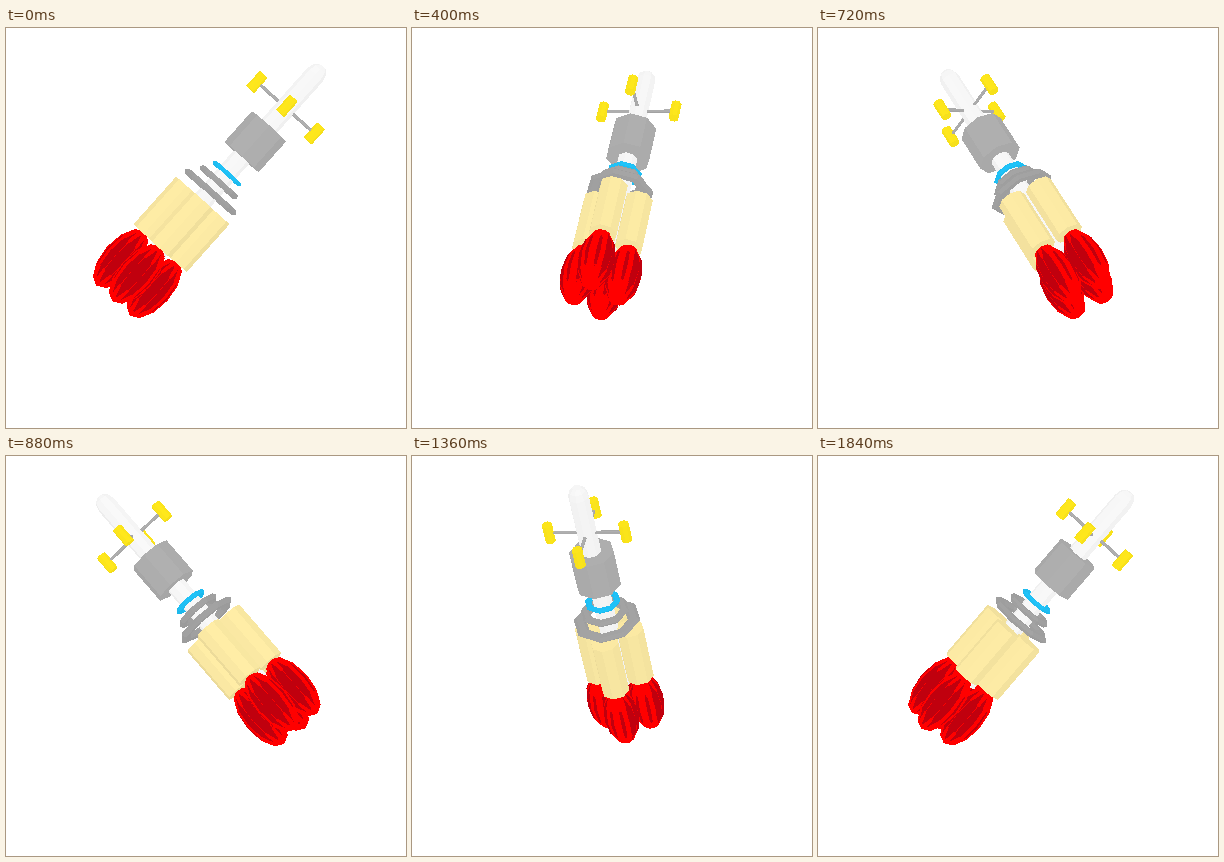
These frames come from a looping animation (400x400 px, 1920 ms). An HTML page with a canvas:

```html
<!DOCTYPE html>
<html lang="en">
<head>
<meta charset="utf-8">
<title>Rocket</title>
<style>
  html, body { margin: 0; width: 100%; height: 100%; overflow: hidden; background: #fff; }
  canvas { display: block; width: 100vw; height: 100vh; }
</style>
</head>
<body>
<canvas id="stage" width="400" height="400"></canvas>
<script>
const SIZE = 400, STEP_MS = 80, STEPS = 24, CAMERA = 2500;
const TILT = 41.8 * Math.PI / 180;
const PIVOT = { x: 201.5, y: 167.2, z: 6 };
const LIGHT = [0, 0.2, 0.98];

const WHITE = [249, 249, 249], GRAY = [176, 176, 176], RING = [165, 165, 165],
      BLUE = [32, 196, 250], CREAM = [255, 237, 166], YELLOW = [255, 232, 28],
      RED = [255, 0, 0], DARK = [192, 0, 14];

// Rocket axes: along the body, across it, and towards the viewer.
const ALONG = [Math.sin(TILT), Math.cos(TILT), 0];
const ACROSS = [Math.cos(TILT), -Math.sin(TILT), 0];
const FRONT = [0, 0, 1];
const SIDES = [0, 1, 2, 3].map(i => i * Math.PI / 2);

const faces = [];
const mix = (...terms) => [0, 1, 2].map(i => terms.reduce((sum, [k, v]) => sum + k * v[i], 0));
const outward = angle => mix([Math.cos(angle), ACROSS], [Math.sin(angle), FRONT]);

// Revolves a profile of [distance, radius] pairs around an axis.
function lathe(profile, color, o = {}) {
  const { base = [0, 0, 0], axis = ALONG, u = ACROSS, v = FRONT,
          segments = 8, phase = 0, shade = 0.08 } = o;
  const point = ([d, r], k) => {
    const a = (k + phase) * 2 * Math.PI / segments;
    return mix([1, base], [d, axis], [r * Math.cos(a), u], [r * Math.sin(a), v]);
  };
  for (let i = 1; i < profile.length; i++) {
    for (let k = 0; k < segments; k++) {
      const a = point(profile[i - 1], k), b = point(profile[i - 1], k + 1);
      const c = point(profile[i], k + 1), d = point(profile[i], k);
      if (profile[i - 1][1]) faces.push({ points: [a, b, c], color, shade });
      if (profile[i][1]) faces.push({ points: [a, c, d], color, shade });
    }
  }
}

const cylinder = (from, to, r, color, o) =>
  lathe([[from, 0], [from, r], [to, r], [to, 0]], color, o);

function arc(count, place) {
  return Array.from({ length: count + 1 }, (_, i) => place(i / count));
}

// A flattened torus between two radii.
function ring(at, inner, outer, thick, color) {
  const middle = (inner + outer) / 2, width = (outer - inner) / 2;
  lathe(arc(6, t => [at + thick * Math.sin(t * 2 * Math.PI),
                     middle + width * Math.cos(t * 2 * Math.PI)]), color, { shade: 0.06 });
}

// An ellipsoid with separate radii across and towards the front.
function ellipsoid(at, length, across, front, color, o) {
  lathe(arc(6, t => [at - length * Math.cos(t * Math.PI), t % 1 ? Math.sin(t * Math.PI) : 0]),
    color, { ...o, u: mix([across, ACROSS]), v: mix([front, FRONT]) });
}

function buildRocket() {
  lathe([[-80, 0], [-80, 10], [161, 10.3], [168, 8.5], [172, 4.5], [172, 0]], WHITE, { shade: 0.05 });
  cylinder(51, 92, 22.8, GRAY, { shade: 0.06 });
  ring(29, 11.5, 18.3, 2.6, BLUE);
  ring(17, 15.5, 24.8, 3.4, RING);
  ring(4.4, 21.5, 34.5, 3.7, RING);
  for (const angle of SIDES) {
    const out = outward(angle), side = outward(angle + Math.PI / 2);
    cylinder(0, 38, 1.7, GRAY, { base: mix([117, ALONG]), axis: out, u: ALONG, v: side, segments: 6 });
    cylinder(107, 127, 5.4, YELLOW, { base: mix([38.5, out]), shade: 0.05 });
    cylinder(-71, -7, 14.2, CREAM, { base: mix([21.5, out]) });
    // Two faceted bodies cut through each other, which leaves jagged tongues.
    const flame = { base: mix([22.5, out]), segments: 10, shade: 0 };
    ellipsoid(-105, 36.3, 18, 17.4, RED, flame);
    ellipsoid(-105, 34.6, 17.6, 18.4, DARK, { ...flame, phase: 0.5 });
  }
}

const context = document.getElementById('stage').getContext('2d');
const image = context.createImageData(SIZE, SIZE);
const pixels = new Uint32Array(image.data.buffer);
const depth = new Float32Array(SIZE * SIZE);

function litColor({ color, shade }, [a, b, c]) {
  const p = b.map((n, i) => n - a[i]), q = c.map((n, i) => n - a[i]);
  const n = [p[1] * q[2] - p[2] * q[1], p[2] * q[0] - p[0] * q[2], p[0] * q[1] - p[1] * q[0]];
  const facing = Math.sign(n[2]) / (Math.hypot(...n) || 1);
  const light = Math.max(0, facing * (n[0] * LIGHT[0] + n[1] * LIGHT[1] + n[2] * LIGHT[2]));
  const [r, g, bl] = color.map(v => Math.round(v * (1 - shade * (1 - light))));
  return (255 << 24 | bl << 16 | g << 8 | r) >>> 0;
}

function project([x, y, z]) {
  const scale = CAMERA / (CAMERA - z), half = SIZE / 2;
  return [half + (PIVOT.x + x - half) * scale, half + (PIVOT.y - y - half) * scale, z];
}

function fillTriangle([a, b, c], color) {
  const area = (b[0] - a[0]) * (c[1] - a[1]) - (b[1] - a[1]) * (c[0] - a[0]);
  if (Math.abs(area) < 1e-6) return;
  const range = i => [
    Math.max(0, Math.floor(Math.min(a[i], b[i], c[i]))),
    Math.min(SIZE - 1, Math.ceil(Math.max(a[i], b[i], c[i])))
  ];
  const [left, right] = range(0), [top, bottom] = range(1);
  for (let y = top; y <= bottom; y++) {
    for (let x = left; x <= right; x++) {
      const px = x + 0.5 - a[0], py = y + 0.5 - a[1];
      const s = (px * (c[1] - a[1]) - py * (c[0] - a[0])) / area;
      const t = (py * (b[0] - a[0]) - px * (b[1] - a[1])) / area;
      if (s < 0 || t < 0 || s + t > 1) continue;
      const z = a[2] + s * (b[2] - a[2]) + t * (c[2] - a[2]);
      const at = y * SIZE + x;
      if (z > depth[at]) {
        depth[at] = z;
        pixels[at] = color;
      }
    }
  }
}

function render(step) {
  const angle = step / STEPS * 2 * Math.PI, cos = Math.cos(angle), sin = Math.sin(angle);
  const turn = ([x, y, z]) => [x * cos + (z + PIVOT.z) * sin, y, (z + PIVOT.z) * cos - x * sin];
  pixels.fill(0xffffffff);
  depth.fill(-1e9);
  for (const face of faces) {
    const turned = face.points.map(turn);
    fillTriangle(turned.map(project), litColor(face, turned));
  }
  context.putImageData(image, 0, 0);
}

buildRocket();
const start = performance.now();
let shown = -1;
function tick() {
  const step = Math.floor((performance.now() - start) / STEP_MS) % STEPS;
  if (step !== shown) render(shown = step);
  requestAnimationFrame(tick);
}
tick();
</script>
</body>
</html>
```
